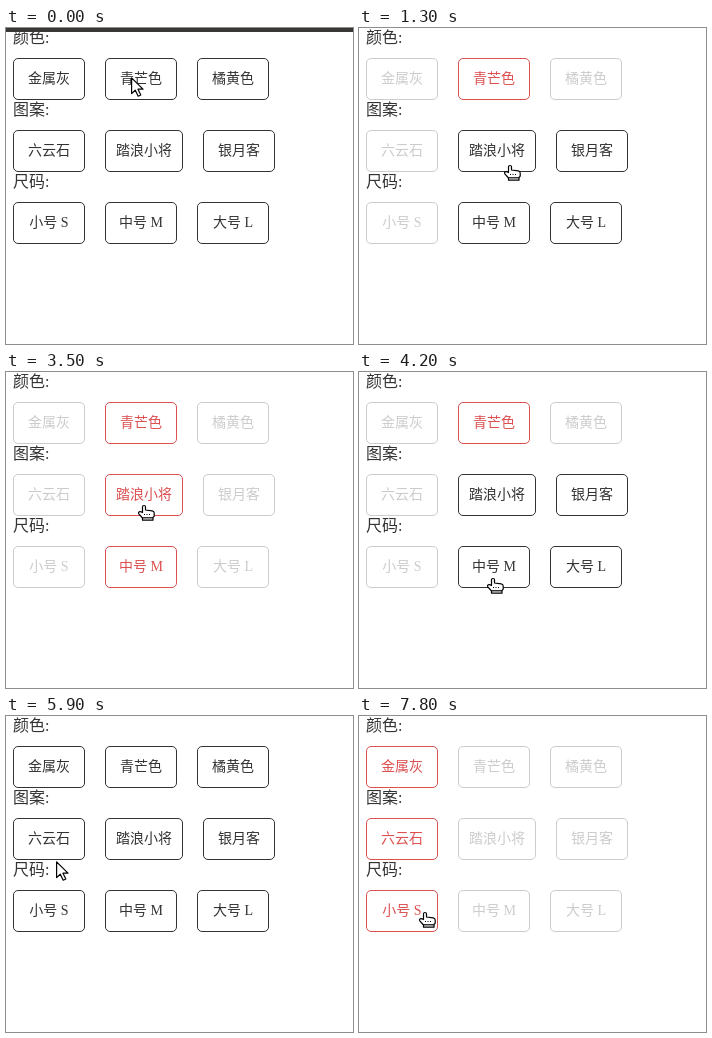
These frames come from a looping animation (347 by 316 pixels, 8000 ms). An HTML page:

```html
<!DOCTYPE html>
<html lang="zh">
<head>
<meta charset="utf-8">
<title>规格选择</title>
<style>
  html, body { margin: 0; width: 100%; height: 100%; overflow: hidden; background: #fff; }
  svg { display: block; }
  text { font: 16px "Liberation Serif", "Noto Sans CJK SC", serif; fill: #333; }
  .opt rect { fill: #fff; stroke: currentColor; }
  .opt text { font-size: 14px; text-anchor: middle; fill: currentColor; }
  .normal { color: #333; }
  .selected { color: #dc5050; }
  .disabled { color: #ccc; }
  .cursor path { fill: #fff; stroke: #000; stroke-width: 1.2; stroke-linejoin: round; }
  .cursor .dots { fill: none; stroke-width: 1; stroke-dasharray: 1 1.5; }
</style>
</head>
<body>
<svg id="stage" width="347" height="316" viewBox="0 0 347 316">
  <g id="form"></g>
  <rect id="bar" width="347" height="4" fill="#3a3737"/>
  <g class="cursor" id="arrow">
    <path d="M.6 .8V16.6L4.3 13.2L7.2 19.2L9.8 18L7 12.2H12Z"/>
  </g>
  <g class="cursor" id="hand">
    <path d="M-1.5 8.5V2.8Q-1.5 1.5 0 1.5T1.5 2.8V6L8.2 6.8Q10.2 7.2 10.2 9V12.2L9 13.5V16.2H-1.5V14L-5.2 9.8Q-6 8 -4.2 7.6Q-3 7.5 -1.5 8.5Z"/>
    <path class="dots" d="M0 10.5H7"/>
    <path d="M-1.5 13.8H9"/>
  </g>
</svg>
<script>
const LOOP = 8000, STEP = 100, MAX_MOVE = 300, HOVER_FROM = 500;
const $ = id => document.getElementById(id);

const rows = [
  ['颜色:', '金属灰', '青芒色', '橘黄色'],
  ['图案:', '六云石', '踏浪小将', '银月客'],
  ['尺码:', '小号 S', '中号 M', '大号 L']
];

// Combinations in stock
const stock = [
  ['金属灰', '六云石', '小号 S'],
  ['橘黄色', '六云石', '小号 S'],
  ['青芒色', '踏浪小将', '中号 M'],
  ['青芒色', '银月客', '大号 L']
];

// Pointer stops: time of arrival, x, y, and whether it clicks there
const CLICK = true;
const stops = [
  [0, 125, 49],
  [700, 128, 53, CLICK],
  [1000, 140, 95],
  [1300, 151, 136],
  [1800, 151, 136, CLICK],
  [1900, 156, 147],
  [2400, 178, 165],
  [2700, 167, 180, CLICK],
  [2900, 167, 193],
  [3500, 138, 132],
  [3900, 138, 132, CLICK],
  [4200, 134, 205, CLICK],
  [4600, 146, 52],
  [4900, 148, 20],
  [5000, 148, 65],
  [5100, 148, 65, CLICK],
  [5400, 53, 57],
  [5700, 50, 144],
  [5900, 50, 145],
  [6100, 46, 136],
  [6400, 46, 136, CLICK],
  [6700, 163, 83],
  [7000, 78, 51],
  [7200, 61, 39, CLICK],
  [7500, 50, 161],
  [7800, 66, 195, CLICK]
];

function add(parent, tag, attrs, text) {
  const el = document.createElementNS('http://www.w3.org/2000/svg', tag);
  for (const k in attrs) el.setAttribute(k, attrs[k]);
  if (text) el.textContent = text;
  return parent.appendChild(el);
}

const options = [];
rows.forEach(([label, ...names], row) => {
  const y = 30 + 72 * row;
  let x = 7;
  add($('form'), 'text', { x, y: y - 15 }, label);
  for (const name of names) {
    const el = add($('form'), 'g', { class: 'opt normal' });
    const text = add(el, 'text', { y: y + 25 }, name);
    const w = /^\S{4}$/.test(name) ? 78 : 72;
    text.setAttribute('x', x + w / 2);
    el.prepend(add(el, 'rect', { x: x + .5, y: y + .5, width: w - 1, height: 41, rx: 4.5 }));
    options.push({ el, name, row, x, y, w });
    x += w + 20;
  }
});

const optionAt = (x, y) =>
  options.find(o => x >= o.x && x < o.x + o.w && y >= o.y && y < o.y + 42);

// Each click toggles the option under the pointer
function selectionAt(t) {
  const picked = new Set();
  for (const [time, x, y, click] of stops) {
    if (!click || time > t) continue;
    const o = optionAt(x, y);
    if (!picked.delete(o)) picked.add(o);
  }
  return [...picked];
}

function stateOf(option, picked) {
  if (picked.includes(option)) return 'selected';
  const rival = picked.some(p => p.row === option.row);
  const offered = stock.some(set => [...picked, option].every(o => set.includes(o.name)));
  return rival || !offered ? 'disabled' : 'normal';
}

// The pointer rests one step after arriving and moves just before the next stop
function pointerAt(t) {
  const next = stops.findIndex(s => s[0] > t);
  const [, ...last] = stops.at(-1);
  if (next < 0) return last;
  const [t0, x0, y0] = stops[next - 1], [t1, x1, y1] = stops[next];
  const leave = Math.min(t1 - STEP, Math.max(t0 + STEP, t1 - MAX_MOVE));
  const p = Math.max(0, (t - leave) / (t1 - leave));
  return [x0 + (x1 - x0) * p, y0 + (y1 - y0) * p].map(Math.round);
}

function draw(now) {
  const t = Math.floor(now % LOOP / STEP) * STEP;
  const picked = selectionAt(t);
  for (const o of options) o.el.setAttribute('class', 'opt ' + stateOf(o, picked));

  const [x, y] = pointerAt(t);
  const over = t >= HOVER_FROM && !!optionAt(x, y);
  for (const id of ['arrow', 'hand']) {
    $(id).setAttribute('transform', `translate(${x} ${y})`);
    $(id).style.display = (id === 'hand') === over ? '' : 'none';
  }
  $('bar').style.display = t < HOVER_FROM ? '' : 'none';
}

const start = performance.now();
function tick() {
  draw(performance.now() - start);
  requestAnimationFrame(tick);
}
tick();
</script>
</body>
</html>
```
